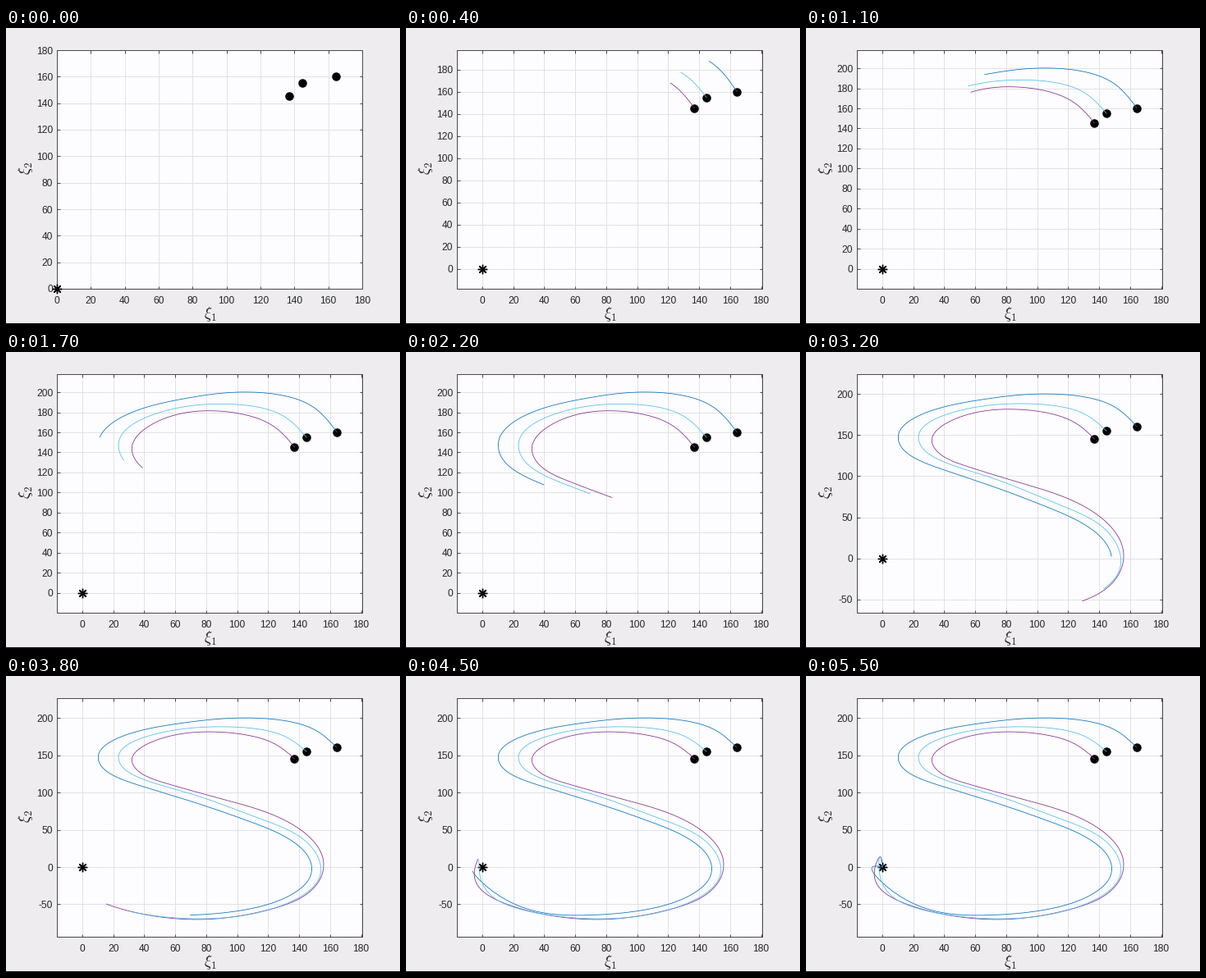
These frames come from a looping animation (480x361 px, 5.7 s). A matplotlib script:

```python
import numpy as np
import matplotlib.pyplot as plt
from matplotlib.animation import FuncAnimation
from matplotlib.patches import Rectangle
from matplotlib.ticker import MultipleLocator

W, H, FRAMES, SUB = 480, 361, 57, 10
PX = 0.72  # points per pixel at 100 dpi
INK, EDGE = "#262626", "#4a4a4a"
plt.rcParams.update({"font.family": "Liberation Sans", "mathtext.fontset": "cm",
                     "axes.unicode_minus": False})

# Key poses: every track passes its k-th point at step TIMES[k].
TIMES = [1, 4, 8, 11, 15, 17, 19, 22, 25, 27, 29, 31, 33, 35, 38, 42, 47, 50]
TRACKS = {
    "#0072bd": [(164.3, 160.3), (146.5, 187.7), (98, 199.9), (66, 193.7),
                (23.7, 173.7), (11.3, 155.3), (13.5, 132.5), (39.7, 107.7),
                (78.3, 82.8), (103.5, 64.6), (127, 45), (144, 19.4),
                (146.7, -14.6), (125, -46.5), (69.8, -64.4), (7.5, -33.6),
                (-2.6, 1), (0, 0)],
    "#7e2f8e": [(137, 145.3), (121.5, 168), (85.5, 181.4), (57.2, 176.1),
                (32, 144.7), (38.8, 124.8), (55.3, 111.6), (83.6, 95.1),
                (126, 67.5), (146, 41.5), (155.5, 10), (140.5, -42),
                (116, -59.5), (78, -70.2), (15.6, -49.6), (-4.8, -1.4),
                (-1.3, 13.9), (0, 0)],
    "#4dbeee": [(144.7, 155), (128.3, 177.6), (87.3, 188.3), (55.6, 182.3),
                (24.2, 154), (26.8, 132.3), (41.5, 116.1), (69.4, 98.8),
                (111.2, 67.7), (137.4, 44.8), (152.2, 13.2), (151.5, -20.5),
                (129.8, -50.8), (92.8, -67.8), (32.6, -60.5), (-0.8, -17.5),
                (-1.3, 13.9), (0, 0)],
}


def trace(points):
    """Natural cubic spline by chord length, sampled SUB times per step."""
    p = np.array(points, float)
    u = np.r_[0, np.cumsum(np.hypot(*np.diff(p, axis=0).T))]
    h, n = np.diff(u), len(u)
    slope = np.diff(p, axis=0) / h[:, None]
    a, rhs = np.eye(n), np.zeros_like(p)
    for i in range(1, n - 1):
        a[i, i - 1:i + 2] = h[i - 1], 2 * (h[i - 1] + h[i]), h[i]
        rhs[i] = 6 * (slope[i] - slope[i - 1])
    m = np.linalg.solve(a, rhs)

    steps = np.arange((FRAMES - 1) * SUB + 1) / SUB
    s = np.interp(steps, TIMES, u)
    i = np.clip(np.searchsorted(u, s) - 1, 0, n - 2)
    v = ((s - u[i]) / h[i])[:, None]
    w = 1 - v
    bend = ((w**3 - w) * m[i] + (v**3 - v) * m[i + 1]) * (h[i] ** 2)[:, None] / 6
    return w * p[i] + v * p[i + 1] + bend


def padded(values):
    lo, hi = min(0, values.min()), values.max()
    pad = 0.1 * (hi - lo)
    return lo - pad, hi + pad


def plan_views(tips):
    """Axis limits per step, refitted only when a tip leaves the view."""
    views = [((0, 180), (0, 180))]
    for n in range(1, FRAMES):
        x, y = tips[:, :n + 1, 0], tips[:, :n + 1, 1]
        lo, hi = views[-1][1]
        if n == 1 or y.min() < lo or y.max() > hi:
            views.append((padded(x), padded(y)))
        else:
            views.append(views[-1])
    return views


paths = [trace(points) for points in TRACKS.values()]
views = plan_views(np.array([path[::SUB] for path in paths]))

fig = plt.figure(figsize=(W / 100, H / 100), dpi=100, facecolor="#eeecef")
ax = fig.add_axes([62 / W, 43 / H, 372 / W, 291 / H], facecolor="#fdfcfe")
ax.set_axisbelow(True)
ax.grid(color="#e2e1e3", lw=PX)
for spine in ax.spines.values():
    spine.set(color=EDGE, linewidth=PX)
ax.tick_params(direction="in", top=True, right=True, length=3.5 * PX, width=PX,
               color=EDGE, labelcolor=INK, labelsize=12 * PX)
ax.tick_params(axis="x", pad=8.7 * PX)
ax.tick_params(axis="y", pad=4.7 * PX)
ax.xaxis.set_major_locator(MultipleLocator(20))

label = dict(ha="center", va="center", fontsize=19 * PX, color=INK)
fig.text(249 / W, 1 - 348.5 / H, r"$\xi_1$", **label)
fig.text(24 / W, 1 - 170.5 / H, r"$\xi_2$", rotation=90, **label)
fig.add_artist(Rectangle((0, 0), 1, 1 / H, transform=fig.transFigure,
                         fc="#1c1c1c", lw=0))

lines = []
for color, path in zip(TRACKS, paths):
    ax.plot(*path[0], "o", color="black", ms=10.5 * PX, mew=0, zorder=4)
    lines += ax.plot([], [], color=color, lw=0.78 * PX, zorder=5)
ax.plot(0, 0, marker=(8, 2, 0), color="black", ms=11.5 * PX, mew=1.4 * PX,
        clip_on=False, zorder=4)


def update(n):
    xlim, ylim = views[n]
    ax.set(xlim=xlim, ylim=ylim)
    ax.yaxis.set_major_locator(MultipleLocator(20 if ylim[1] - ylim[0] < 250 else 50))
    for line, path in zip(lines, paths):
        line.set_data(*path[:n * SUB + 1].T)
    return lines


anim = FuncAnimation(fig, update, frames=FRAMES, interval=100, repeat=True,
                     repeat_delay=0, blit=False)
plt.show()
```
